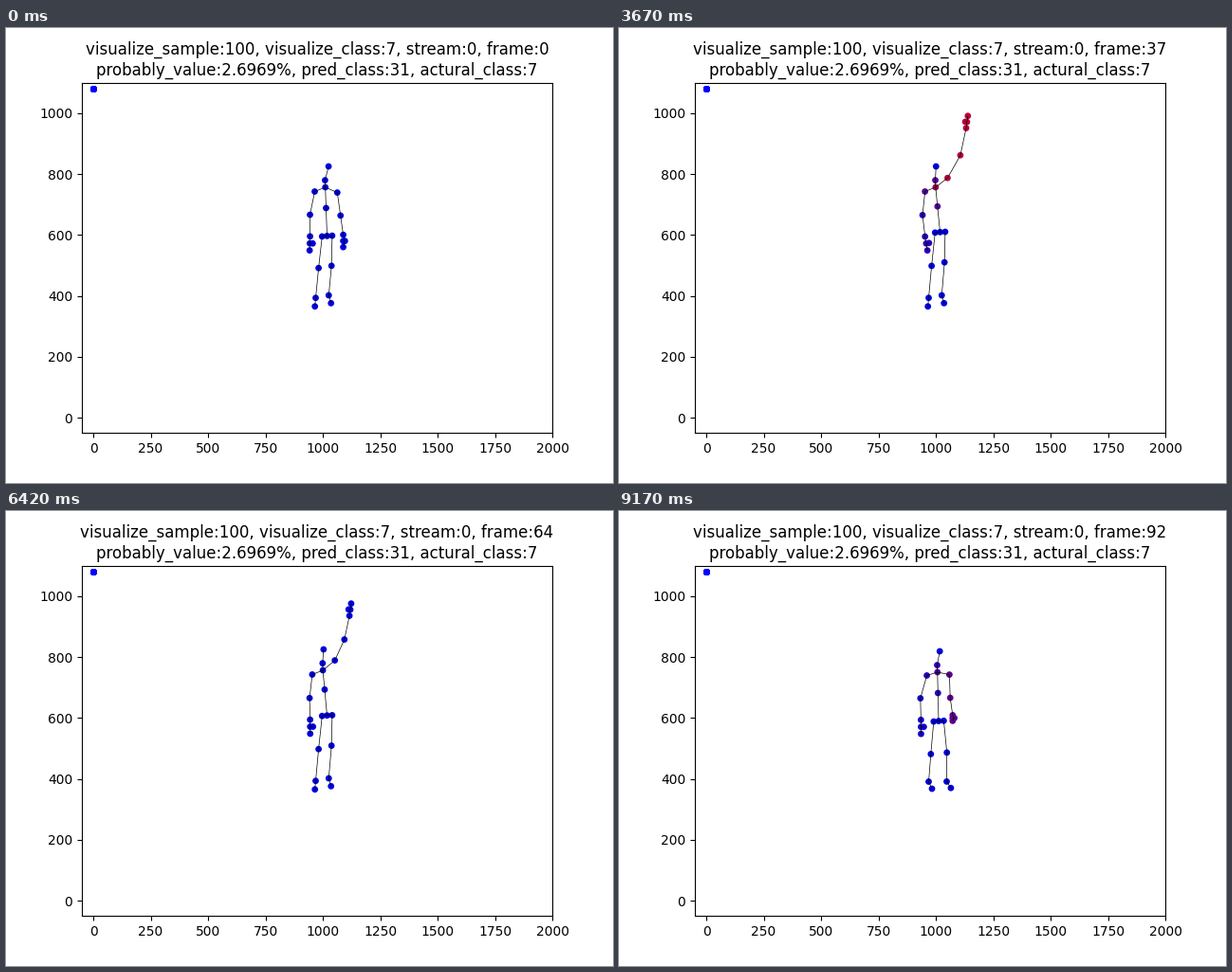
A matplotlib script that plays this animation: 640x480 px, repeating every 9260 ms.

```python
import numpy as np
import matplotlib.pyplot as plt
from matplotlib.animation import FuncAnimation
from matplotlib.collections import LineCollection

STEP, COUNT = 20, 463     # ms per tick, ticks per loop
LAST_POSE = 92

CHAINS = [
    "head neck chest mid base",
    "chest shoulder_l elbow_l wrist_l hand_l tip_l",
    "chest shoulder_r elbow_r wrist_r hand_r tip_r",
    "hand_l thumb_l", "hand_r thumb_r",
    "base hip_l knee_l ankle_l foot_l",
    "base hip_r knee_r ankle_r foot_r",
]
# how strongly each group of joints turns red
WEIGHTS = {
    "shoulder_r elbow_r wrist_r hand_r tip_r thumb_r": 0.73,
    "chest": 0.62,
    "neck mid shoulder_l": 0.32,
    "elbow_l wrist_l hand_l tip_l thumb_l": 0.16,
}


def ease(n, start, end):
    u = min(max((n - start) / (end - start), 0), 1)
    return u * u * (3 - 2 * u)


def polar(length, deg):
    """Vector in stage pixels; 0 degrees hangs straight down."""
    a = np.radians(deg)
    return length * np.array([np.sin(a), np.cos(a)])


def pose(n):
    """Joint positions in stage pixels."""
    upper = ease(n, 22, 40) - ease(n, 79, 92)
    fore = ease(n, 12, 32) - ease(n, 79, 92)
    fold = np.sin(np.pi * fore)
    late = ease(n, 78, 92)
    sag = ease(n, 48, 78) * upper
    lean = upper - 0.3 * sag + 0.3 * late
    sway = np.cos(2 * np.pi * (n - 12) / 22)
    j = {}

    def add(name, parent, *offset):
        j[name] = j[parent] + np.array(offset)

    def arm(side, up, low, palm, spread):
        """Each of up, low and palm is a length and an angle."""
        elbow, wrist, hand, tip, thumb = (
            p + side for p in ("elbow", "wrist", "hand", "tip", "thumb"))
        add(elbow, "shoulder" + side, *polar(*up))
        add(wrist, elbow, *polar(*low))
        add(tip, wrist, *polar(*palm))
        j[hand] = (j[wrist] + j[tip]) / 2
        add(thumb, hand, *polar(spread, palm[1] + 90))

    # spine
    j["chest"] = np.array([336.7 - 3.1 * lean, 168 + 2 * late])
    j["base"] = np.array([338.5 - 1.5 * late, 219.4 - 4.4 * upper + 1.3 * sag + 2.2 * late])
    j["mid"] = j["base"] + 0.573 * (j["chest"] - j["base"])
    add("neck", "chest", -0.3, -7.4)
    add("head", "chest", 3.4 - 3.2 * lean, -22)

    # arms
    add("shoulder_l", "chest", -11.2, 4.5 - late)
    arm("_l", (25, -11.5 + 6 * lean - 6 * late), (22.8, 4 + 4 * sway),
        (14.8, 5 + 7 * sway), 3)
    add("shoulder_r", "chest", 12.6 - 6 * fold, 5.6 - 8 * (upper + fore) - 3 * late)
    arm("_r",
        (24.5 + 3.2 * upper - 6.3 * sag - 17 * fold, 8 + 154 * upper - 12 * sag - 6 * late),
        (20.5 + 9.5 * upper - 8 * sag - 19 * fold - 2 * late, 8 + 160 * fore),
        (13 - 10 * fold - 7 * late, 172 * fore + 60 * fold), 1.8)

    # legs: knees follow the pelvis, the feet take one late step
    sink = j["base"][1] - 219
    add("hip_l", "base", -5.2, 0.5)
    add("hip_r", "base", 5.4, -0.3)
    j["knee_l"] = np.array([329.6 - 0.8 * late, 253 + 0.55 * sink + 2 * late])
    j["knee_r"] = np.array([343.2 + 2.5 * late, 250.5 + 0.9 * sink + 2 * late])
    j["ankle_l"] = np.array([326.5, 284.7 + 0.8 * late])
    j["ankle_r"] = np.array([340.3 + 5.2 * late, 282 + 3.4 * late])
    j["foot_l"] = np.array([325.7 + 4.3 * late, 293.7 - 0.7 * late])
    j["foot_r"] = np.array([342.7 + 7.2 * late, 290.3 + 1.9 * late])
    return j


def to_data(p):
    return np.column_stack([(p[:, 0] - 80) / 496 * 2050 - 50,
                            1100 - (p[:, 1] - 57.6) / 369.6 * 1150])


names = list(pose(0))
bones = []
for chain in CHAINS:
    ids = [names.index(name) for name in chain.split()]
    bones += zip(ids, ids[1:])
bones = np.array(bones)

weight_of = {name: w for group, w in WEIGHTS.items() for name in group.split()}
weights = np.array([weight_of.get(name, 0) for name in names])


def tint(n):
    """Blue joints glow red while the arm rises, and again a little at the end."""
    glow = ease(n, 8, 36) - ease(n, 48, 64) + 0.5 * ease(n, 64, 80)
    red = weights * glow
    return np.column_stack([red, 0 * red, 0.87 * (1 - red)])


def pose_at(t):
    """12 ticks a second, every sixth tick repeats the pose before it."""
    tick = int((t + 5) * 0.012)
    return min(tick - (tick + 3) // 6, LAST_POSE)


fig, ax = plt.subplots(figsize=(6.4, 4.8), dpi=100)
ax.set_xlim(-50, 2000)
ax.set_ylim(-50, 1100)
title = ax.set_title("")
# the second, empty body piles up in the corner
ax.scatter(np.zeros(25), np.full(25, 1080), s=15, color="blue")
dots = ax.scatter(np.zeros(len(names)), np.zeros(len(names)), s=15)
lines = LineCollection([], colors="black", linewidths=0.5, zorder=2)
ax.add_collection(lines, autolim=False)


def update(k):
    n = pose_at(k * STEP + STEP / 2)
    joints = pose(n)
    points = to_data(np.array([joints[name] for name in names]))
    title.set_text(f"visualize_sample:100, visualize_class:7, stream:0, frame:{n}\n"
                   "probably_value:2.6969%, pred_class:31, actural_class:7")
    dots.set_offsets(points)
    dots.set_color(tint(n))
    lines.set_segments(points[bones])
    return title, dots, lines


anim = FuncAnimation(fig, update, frames=COUNT, interval=STEP,
                     repeat=True, repeat_delay=0, blit=False)
plt.show()
```
